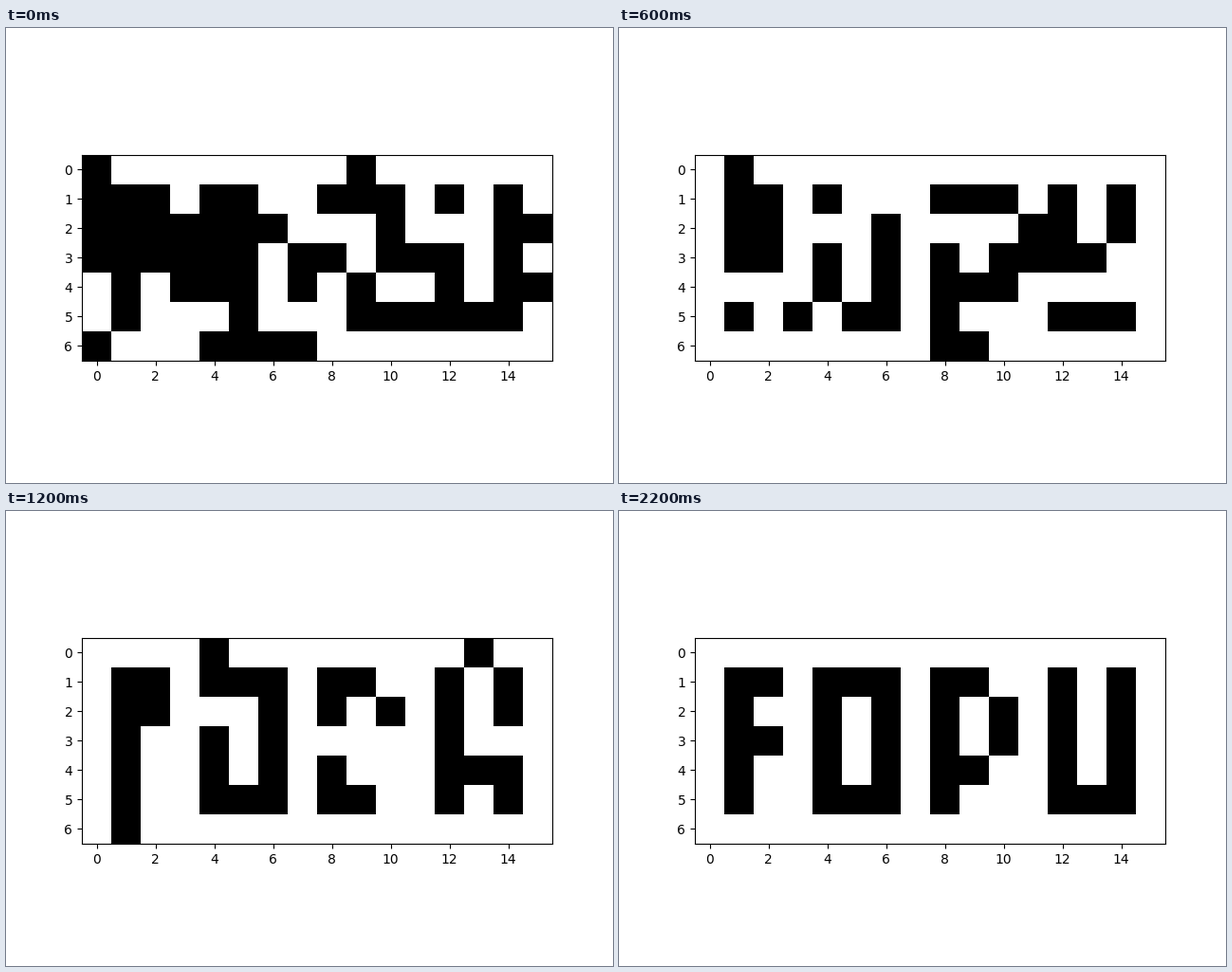
Recreate the animation shown at these times as a matplotlib script. Size 640x480 px, loop 10 s.

```python
import numpy as np
import matplotlib.pyplot as plt
from matplotlib.animation import FuncAnimation

ROWS, COLS = 7, 16
FRAMES, INTERVAL = 100, 100
SETTLED = 22          # step at which the word is complete

# How many cells are wrongly black or wrongly white as the word evolves.
STEPS = [0, 3, 6, 10, 14, 18, 22]
EXTRA = [26, 19, 10, 7, 5, 2, 0]
MISSING = [9, 10, 10, 9, 5, 2, 0]


def draw_word():
    """Return the grid with the word FOPU, True where a cell is black."""
    grid = np.zeros((ROWS, COLS), dtype=bool)

    def bar(top, bottom, left, right):
        grid[top:bottom + 1, left:right + 1] = True

    # F
    bar(1, 5, 1, 1)
    bar(1, 1, 1, 2)
    bar(3, 3, 1, 2)
    # O
    bar(1, 5, 4, 4)
    bar(1, 5, 6, 6)
    bar(1, 1, 4, 6)
    bar(5, 5, 4, 6)
    # P
    bar(1, 5, 8, 8)
    bar(1, 1, 8, 9)
    bar(2, 3, 10, 10)
    bar(4, 4, 8, 9)
    # U
    bar(1, 5, 12, 12)
    bar(1, 5, 14, 14)
    bar(5, 5, 12, 14)
    return grid


def weights(cells, step):
    """Errors first crowd the middle rows, then spread evenly."""
    crowd = np.interp(step, [0, 6], [4, 0])
    weight = 1 + crowd * np.exp(-(cells // COLS - 3.0) ** 2 / 2)
    return weight / weight.sum()


def next_errors(wrong, pool, count, step, rng):
    """Keep some errors and add fresh ones, always at least one."""
    if count == 0:
        return wrong[:0]
    keep = np.interp(step, [4, 8], [0.5, 0.8])  # chaos first, then memory
    kept = wrong[rng.random(wrong.size) < keep][:count - 1]
    free = np.setdiff1d(pool, wrong)
    fresh = rng.choice(free, count - kept.size, replace=False,
                       p=weights(free, step))
    return rng.permutation(np.concatenate([kept, fresh]))


def evolve(word, seed=12):
    """Build every generation from noise to the finished word."""
    rng = np.random.default_rng(seed)
    white, black = np.flatnonzero(~word), np.flatnonzero(word)
    extra, missing = white[:0], black[:0]
    generations = []
    for step in range(SETTLED + 1):
        extra_count, missing_count = (
            int(np.ceil(np.interp(step, STEPS, curve)))
            for curve in (EXTRA, MISSING))
        extra = next_errors(extra, white, extra_count, step, rng)
        missing = next_errors(missing, black, missing_count, step, rng)
        cells = word.copy()
        cells.flat[extra] = True
        cells.flat[missing] = False
        generations.append(cells)
    return generations


generations = evolve(draw_word())

fig, ax = plt.subplots(figsize=(6.4, 4.8), dpi=100)
image = ax.imshow(generations[0], cmap="gray_r", vmin=0, vmax=1,
                  interpolation="nearest")
ax.set_xticks(range(0, COLS, 2))
ax.set_yticks(range(ROWS))


def update(frame):
    image.set_data(generations[min(frame, SETTLED)])
    return image,


anim = FuncAnimation(fig, update, frames=FRAMES, interval=INTERVAL,
                     repeat=True, repeat_delay=0, blit=False)
plt.show()
```
